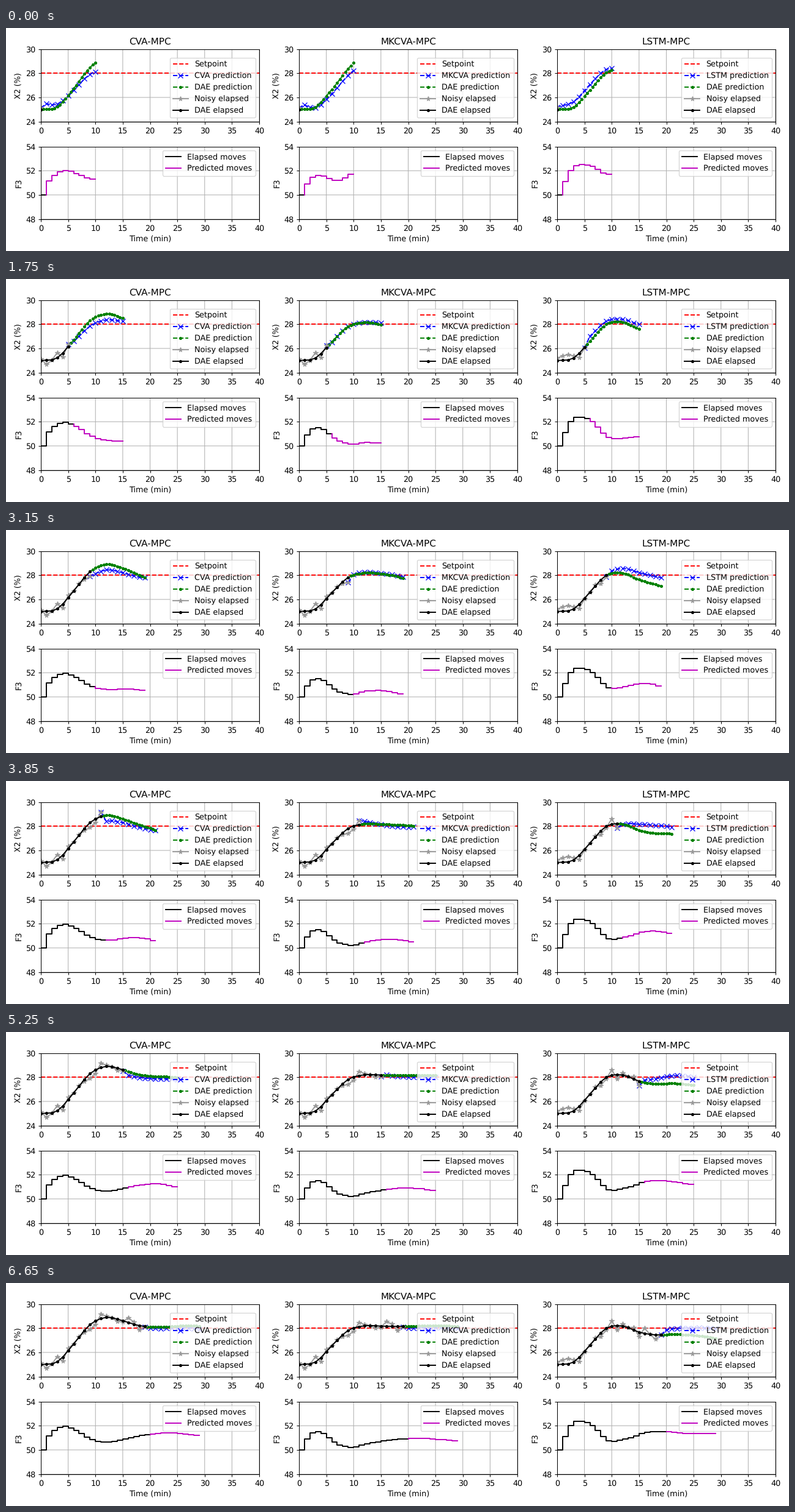
Animation of 1280x366 px, one loop 7000 ms. Source, as a matplotlib script:

```python
import numpy as np
import matplotlib.pyplot as plt
from matplotlib.animation import FuncAnimation

W, H = 1280, 366
DPI = W / 14
STEPS = 20
HORIZON = 10

FINE = np.linspace(0, HORIZON, 21)
COARSE = np.arange(1, HORIZON + 1)
HOLD = np.arange(1, HORIZON)

STATE_T = np.arange(0, 31, 3)
MOVE_T = [0, 1, 2, 4, 6, 9, 12, 16, 20, 24, 28]
PLAN_T = [0, 3, 7, 11, 19]

# Times at which the measurement noise swings from high to low and back
SLOW_SWINGS = [-0.4, 1.1, 3, 4.1, 4.8, 9.6, 11, 14, 16.4, 18.1, 20]
FAST_SWINGS = [2.3, 4.2, 6.2, 8.3, 10, 11, 12, 13, 14, 15, 16, 18, 20]


def curve(t, xs, ys):
    """Smooth cubic curve through the points (xs, ys)."""
    xs, ys = np.asarray(xs, float), np.asarray(ys, float)
    slope = np.gradient(ys, xs)
    i = np.clip(np.searchsorted(xs, t, side="right") - 1, 0, len(xs) - 2)
    h = xs[i + 1] - xs[i]
    s = (t - xs[i]) / h
    return ((1 + 2 * s) * (1 - s) ** 2 * ys[i] + s * (1 - s) ** 2 * h * slope[i]
            + s * s * (3 - 2 * s) * ys[i + 1] + s * s * (s - 1) * h * slope[i + 1])


def noise(t, swings):
    """Swinging error whose strength waxes and wanes every seven minutes."""
    strength = 0.45 * np.abs(np.sin(np.pi * (t - 6) / 7))
    return strength * np.cos(np.pi * np.interp(t, swings, np.arange(len(swings))))


class Panel:
    """One controller: its path, and how far its plans stray from that path.

    Each plan holds the model error early, midway and late in the horizon,
    then the final drift of the plant and of the moves.
    """

    def __init__(self, name, state, moves, plans, swings):
        self.name = name
        self.state_keys, self.move_keys = state, moves
        self.plans = np.array(plans)
        self.past = np.arange(STEPS)
        self.states = self.state(self.past)
        self.moves = self.move(self.past)
        self.noisy = self.states + noise(self.past, swings)

    def state(self, t):
        return curve(t, STATE_T, self.state_keys)

    def move(self, t):
        return curve(t, MOVE_T, self.move_keys)

    def draw_axes(self, top, bottom):
        top.set_title(f"{self.name}-MPC")
        for ax, low, high, label in ((top, 24, 30, "X2 (%)"), (bottom, 48, 54, "F3")):
            ax.set(xlim=(0, 40), ylim=(low, high), ylabel=label,
                   xticks=range(0, 41, 5), yticks=range(low, high + 1, 2))
            ax.grid(True, snap=False)
        bottom.set_xlabel("Time (min)")

        top.plot([0, 40], [28, 28], "r--", label="Setpoint")
        self.model_line, = top.plot([], [], "bx--", label=f"{self.name} prediction")
        self.plant_line, = top.plot([], [], "g.--", label="DAE prediction")
        self.noisy_line, = top.plot([], [], "*-", color="0.6", label="Noisy elapsed")
        self.state_line, = top.plot([], [], "k.-", label="DAE elapsed")
        top.legend(loc="lower right")

        self.moves_line, = bottom.step([], [], "k", label="Elapsed moves")
        self.plan_line, = bottom.step([], [], "m", label="Predicted moves")
        bottom.legend(loc="upper right")

    def update(self, k):
        *bend, drift, move_drift = [np.interp(k, PLAN_T, c) for c in self.plans.T]
        error = np.polyval(np.polyfit([1, 5.5, 10], bend, 2), COARSE)
        model = self.state(k + COARSE) + error
        plant = self.state(k + FINE) + drift * (FINE / FINE[-1]) ** 4
        plan = self.move(k + HOLD) + move_drift * (HOLD / HOLD[-1]) ** 2.5

        seen = slice(k + 1)
        self.noisy_line.set_data(self.past[seen], self.noisy[seen])
        self.state_line.set_data(self.past[seen], self.states[seen])
        self.model_line.set_data(np.arange(k, k + HORIZON + 1),
                                 np.r_[self.noisy[k], model])
        self.plant_line.set_data(k + FINE, plant)
        self.moves_line.set_data(np.arange(k + 2),
                                 np.r_[self.moves[0], self.moves[seen]])
        self.plan_line.set_data(k + COARSE, np.r_[self.moves[k], plan])


panels = [
    Panel("CVA",
          state=[25, 25.22, 26.7, 28.3, 28.9, 28.62, 28.22, 28.1, 28.15, 28.22, 28.15],
          moves=[50, 51.15, 51.6, 51.95, 51.6, 50.83, 50.65, 51, 51.33, 51.39, 51.22],
          plans=[(0.45, -0.05, -0.47, 0.28, 0.5),
                 (0.25, -0.5, -0.46, 0.02, -0.2),
                 (-0.45, -0.55, -0.28, -0.25, -0.55),
                 (-0.5, -0.3, -0.45, -0.42, -0.72),
                 (-0.1, -0.15, -0.25, 0, 0)],
          swings=SLOW_SWINGS),
    Panel("MKCVA",
          state=[25, 25.2, 26.55, 27.82, 28.2, 28.18, 28.15, 28.18, 28.22, 28.22, 28.1],
          moves=[50, 50.9, 51.4, 51.35, 50.65, 50.22, 50.52, 50.8, 50.95, 50.91, 50.73],
          plans=[(0.35, -0.25, 0.2, 0.85, 1.48),
                 (0.05, -0.2, 0.2, 0.18, -0.05),
                 (-0.1, 0.15, -0.32, -0.64, -0.85),
                 (0.2, -0.12, -0.24, -0.15, -0.45),
                 (-0.15, -0.18, -0.2, 0, 0)],
          swings=SLOW_SWINGS),
    Panel("LSTM",
          state=[25, 25.2, 26.6, 28, 28.18, 27.68, 27.45, 27.5, 27.45, 27.32, 27.1],
          moves=[50, 51.1, 52, 52.37, 52, 50.75, 50.9, 51.45, 51.5, 51.35, 51.34],
          plans=[(0.3, 0.48, 0.23, 0.08, 0.97),
                 (0.45, 0, 0.33, 0.4, 0),
                 (0.37, 0.45, 0.32, -0.53, -0.9),
                 (-0.03, 0.6, 0.4, -0.13, -0.3),
                 (0.4, 0.6, 0.8, 0, 0)],
          swings=FAST_SWINGS),
]

plt.rcParams.update({"font.family": "DejaVu Sans", "font.size": 10,
                     "text.hinting": "none"})
fig, axes = plt.subplots(2, 3, figsize=(14, 4.00313), dpi=DPI)
fig.subplots_adjust(left=57 / W, right=1258 / W, top=1 - 34.6 / H,
                    bottom=1 - 313.6 / H, wspace=65 / 357, hspace=41 / 119)
for panel, (top, bottom) in zip(panels, axes.T):
    panel.draw_axes(top, bottom)


def draw(k):
    for panel in panels:
        panel.update(k)


anim = FuncAnimation(fig, draw, frames=STEPS, init_func=lambda: draw(0),
                     interval=350, repeat=True, repeat_delay=0)
plt.show()
```
